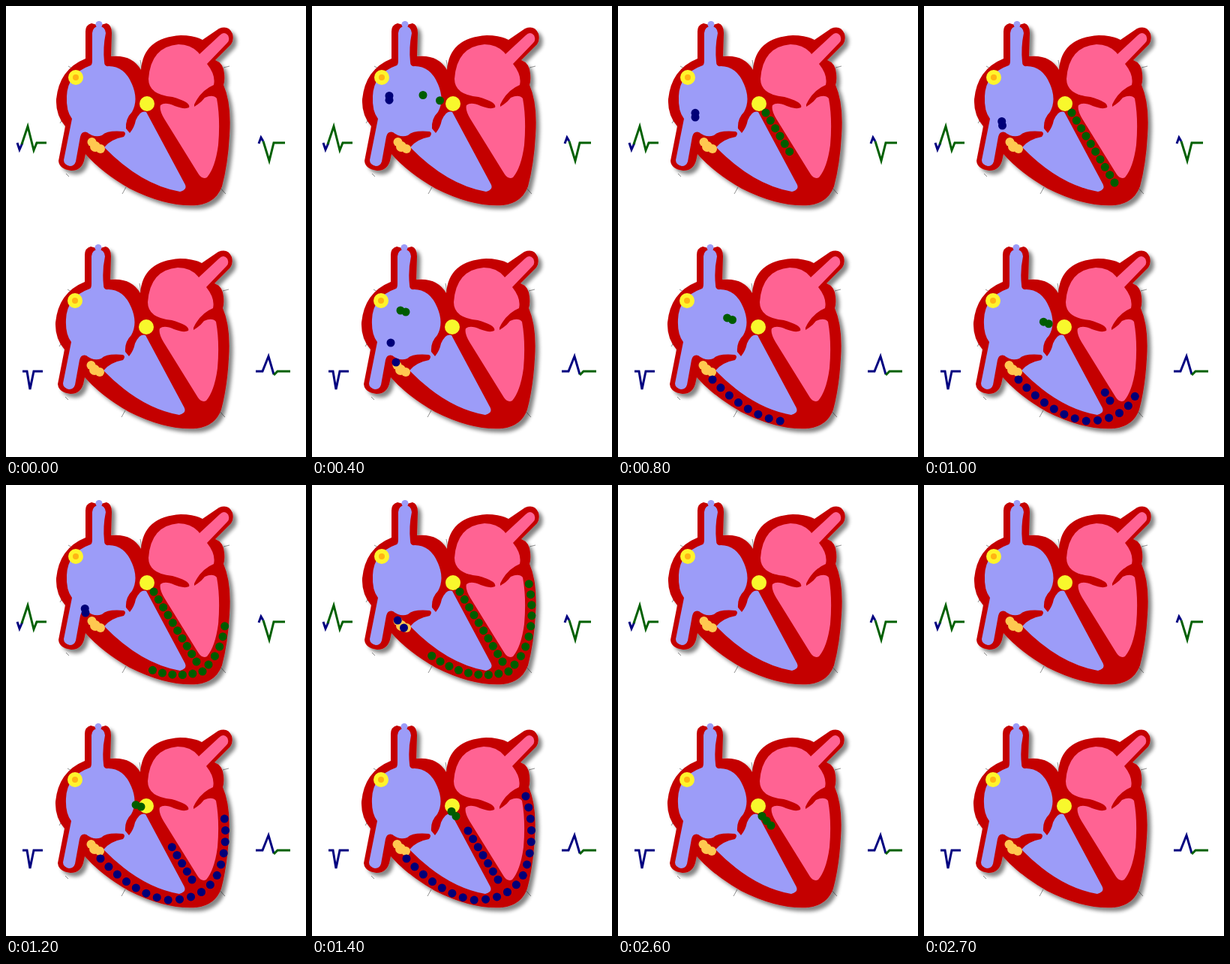
These frames come from a looping animation (400x600 px, 4.1 s). An HTML page:

```html
<!DOCTYPE html>
<html lang="en">
<head>
<meta charset="utf-8">
<title>Conduction pathways</title>
<style>
  html, body { margin: 0; width: 100%; height: 100%; overflow: hidden; background: #fff; }
  svg { display: block; width: 100%; height: 100%; }
  .trace { fill: none; stroke-width: 3; }
  .navy { stroke: #000080; }
  .green { stroke: #006000; }
</style>
</head>
<body>
<svg viewBox="0 0 400 600">
  <defs>
    <filter id="shadow" x="-10%" y="-10%" width="125%" height="125%">
      <feDropShadow dx="5" dy="5" stdDeviation="2.6" flood-color="#000" flood-opacity=".48"/>
    </filter>
    <g id="heart">
      <path fill="none" stroke="#777" stroke-width=".8" d="M83 80l5 3M179 72l2 12M290 82l8-2M155 250l5-9M282 238l11 12M72 156l5-8M80 223l4 4"/>
      <path fill="#c40000" filter="url(#shadow)" d="M106 34Q106 25 114 23L121 25H127L134 23Q141 25 141 36L140 67Q168 64 180 85
        Q183 42 233 39Q250 39 262 45L284 30Q297 25 302 37Q304 46 300 51L279 72Q290 76 291 90Q292 100 290 105
        Q301 130 298 172Q296 210 288 240Q280 262 255 265Q215 268 165 243Q128 222 106 197L104 206Q100 219 87 219
        Q71 217 70 206L79 160Q66 145 67 124Q71 84 106 70Z"/>
      <path fill="#9c9cf8" d="M115 36Q116 27 124 27Q132 27 133 36Q129 55 131 74Q131 81 137 80Q158 80 168 104
        Q177 125 168 141Q159 150 160 163L165 169Q171 162 173 152Q179 138 187 141L238 236Q243 244 232 247
        Q180 238 131 188Q140 177 157 174Q161 169 157 167Q135 165 128 172Q118 176 108 168Q101 166 99 174L93 207
        Q91 213 85 213Q77 211 77 205L88 150Q80 140 81 120Q82 90 113 79Q115 78 115 72Z"/>
      <circle cx="124" cy="24.5" r="4.5" fill="#9c9cf8"/>
      <path fill="#ff6393" d="M190 97Q193 54 230 51Q248 51 258 64L285 39Q291 33 296 39Q299 45 295 49L268 77
        Q280 92 277 105Q260 112 251 131V134Q260 129 265 122Q276 117 281 123Q286 150 283 185Q279 215 268 228
        Q262 231 257 224L211 150Q204 138 206 132Q212 127 225 133Q238 138 244 135Q247 128 222 121Q190 118 190 97Z"/>
      <g fill="#ffc850">
        <circle cx="114.500" cy="181" r="6"/><circle cx="119" cy="187" r="7"/><circle cx="126" cy="190" r="6"/>
      </g>
      <circle cx="93" cy="95" r="10" fill="#fff42c"/>
      <circle cx="93" cy="95" r="4" fill="#ffb414"/>
      <circle cx="188" cy="130" r="10" fill="#f8f82c"/>
    </g>
  </defs>
  <use href="#heart"/>
  <use href="#heart" x="-1" y="297"/>
  <path class="trace navy" d="M15 182L18 191L22 182M337 183L340 175L343 180M22 486H28L32 510L37 486H49M333 486H342L350 466L357 490"/>
  <path class="trace green" d="M21 184L29 160L37 192L41 182H54M343 180L351 206L357 182H372M357 491L362 486H379"/>
  <g id="dots"></g>
</svg>
<script>
const GREEN = '#005c00', NAVY = '#000078';
const STEP = 100, HOLD = 16;

// Pulses glide between [step, x, y] keys and show their latest positions.
const pulses = [
  { color: GREEN, keys: [[1, 103, 104], [5, 193, 133]] },
  { color: NAVY, keys: [[1, 103, 108], [8, 103, 148], [12, 106, 170], [16, 139, 210]] },
  { color: NAVY, keys: [[1, 102, 403], [3, 105, 448], [4, 112, 474]] },
  { color: GREEN, keys: [[1, 104, 401], [4, 125, 407], [12, 180, 428], [16, 204, 453]] },
];
const lastPulse = pulses[3];

// Chains fill a curve with evenly spaced dots from one step to another.
const chains = [
  chain(GREEN, 'M197 142L254 235', 10, 5, 10),
  chain(GREEN, 'M262 248Q205 265 149 219', 10, 10, 16, 2),
  chain(GREEN, 'M270 239C294 213 299 165 286 118', 10, 10.4, 16, 2),
  chain(NAVY, 'M126 497Q172 545 215 552Q262 553 281 520Q302 472 285 414', 20, 4.7, 13),
  chain(NAVY, 'M248 525L208 460', 7, 9, 13),
];

function chain(color, d, size, from, to, ease = 1) {
  const path = document.createElementNS('http://www.w3.org/2000/svg', 'path');
  path.setAttribute('d', d);
  const gap = path.getTotalLength() / (size - 1);
  const dots = Array.from({ length: size }, (_, i) => {
    const { x, y } = path.getPointAtLength(i * gap);
    return dot(x, y, color);
  });
  return step => {
    const u = Math.min(1, Math.max(0, (step - from) / (to - from)));
    return dots.slice(0, Math.round(size * (1 - (1 - u) ** ease))).join('');
  };
}

function dot(x, y, color) {
  return `<circle cx="${x}" cy="${y}" r="5.5" fill="${color}"/>`;
}

function glide(keys, step) {
  const i = Math.max(1, keys.findIndex(k => k[0] >= step));
  const [s0, x0, y0] = keys[i - 1], [s1, x1, y1] = keys[i];
  const u = (step - s0) / (s1 - s0);
  return [x0 + (x1 - x0) * u, y0 + (y1 - y0) * u];
}

function trail({ keys, color }, step, length = 2) {
  if (step > keys.at(-1)[0]) return '';
  let dots = '';
  for (let s = Math.max(1, step - length + 1); s <= step; s++) dots += dot(...glide(keys, s), color);
  return dots;
}

function picture(step) {
  if (step > HOLD + 1) return '';
  if (step > HOLD) return trail(lastPulse, HOLD, 3);
  return chains.map(c => c(step)).join('') + pulses.map(p => trail(p, step)).join('');
}

const layer = document.getElementById('dots');
let shown = -1;

function tick() {
  const t = performance.now() % 4100;
  const step = t < 2600 ? Math.min(HOLD, Math.floor(t / STEP)) : t < 2700 ? HOLD + 1 : HOLD + 2;
  if (step !== shown) layer.innerHTML = picture(shown = step);
  requestAnimationFrame(tick);
}
tick();
</script>
</body>
</html>
```
